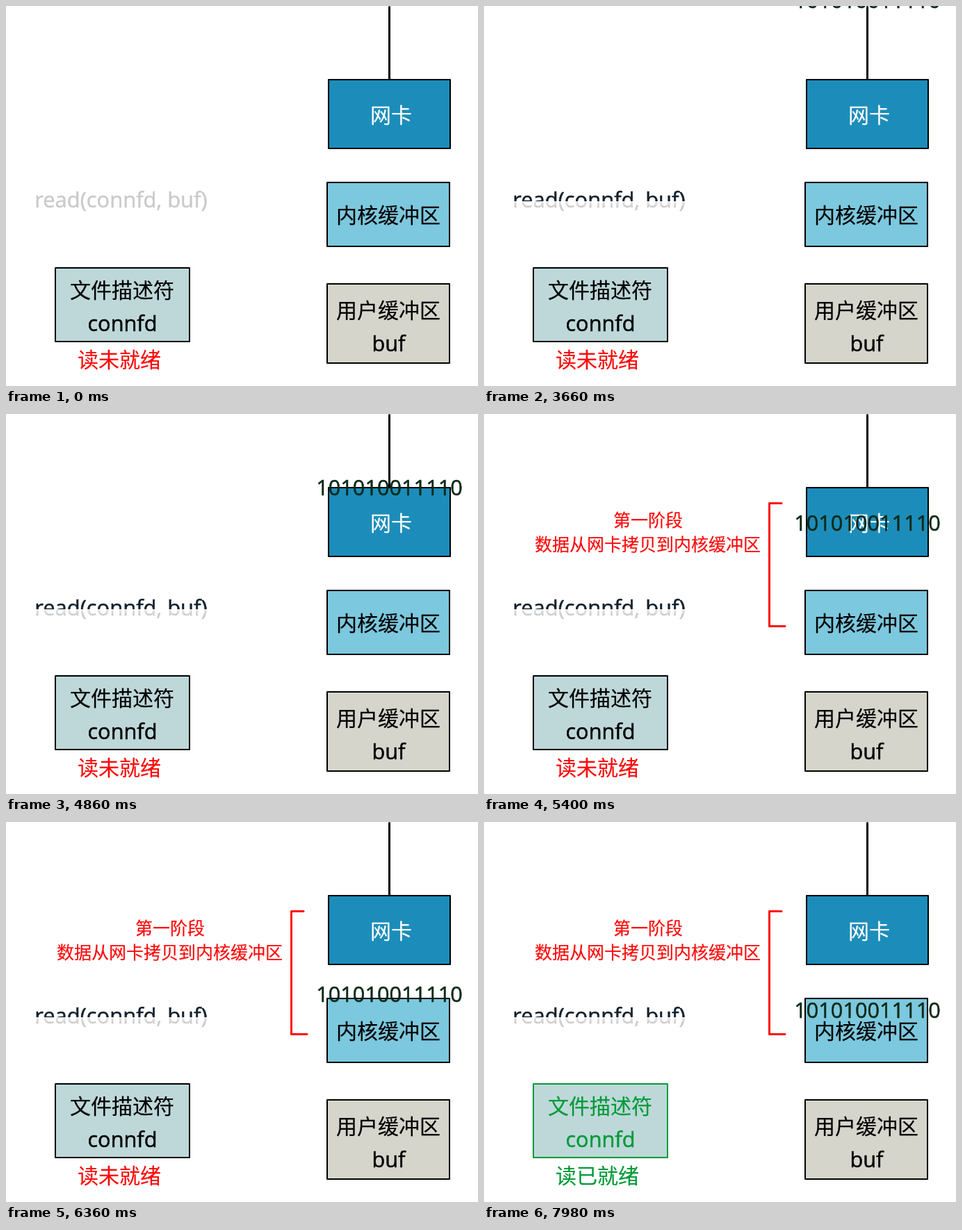
Recreate the animation shown at these times as an HTML page with a canvas. Size 679 px wide and 547 px high, loop 8000 ms.

```html
<!DOCTYPE html>
<html lang="zh">
<head>
<meta charset="utf-8">
<style>
html, body { margin: 0; width: 100%; height: 100%; overflow: hidden; background: #fff; }
canvas { display: block; }
</style>
</head>
<body>
<canvas id="stage" width="679" height="547"></canvas>
<script>
const ctx = document.getElementById('stage').getContext('2d');
const LOOP = 8000, STEP = 60;
const HAN = '"Noto Sans CJK SC", "Noto Sans CJK", sans-serif';
const LATIN = '"Open Sans", "Noto Sans", sans-serif';
const INK = '#000', RED = '#ff0a0a', GREEN = '#009a38', DIGITS = '#0c2a18';

const clamp01 = v => Math.max(0, Math.min(1, v));
const progress = (t, from, to) => clamp01((t - from) / (to - from));
const lerp = (a, b, k) => a + (b - a) * k;

// A hairline outline gives the letters a slightly heavier weight.
function label(text, x, y, color, size, family, weight, align = 'center') {
  ctx.font = `${size}px ${family}`;
  ctx.textAlign = align;
  ctx.fillStyle = ctx.strokeStyle = color;
  ctx.lineWidth = weight;
  ctx.lineJoin = 'round';
  ctx.fillText(text, x, y);
  ctx.strokeText(text, x, y);
}
const han = (text, x, y, color = INK, size = 30) => label(text, x, y, color, size, HAN, 0.2);
const latin = (text, x, y, color = INK) => label(text, x, y, color, 30.7, LATIN, 0.5);

function box(x, y, w, h, fill, border = INK) {
  ctx.fillStyle = fill;
  ctx.fillRect(x, y, w, h);
  ctx.strokeStyle = border;
  ctx.lineWidth = 2;
  ctx.lineJoin = 'round';
  ctx.strokeRect(x, y, w, h);
}

function polyline(color, points) {
  ctx.strokeStyle = color;
  ctx.lineWidth = 3;
  ctx.lineCap = ctx.lineJoin = 'round';
  ctx.beginPath();
  points.forEach(([x, y]) => ctx.lineTo(x, y));
  ctx.stroke();
}

// Grey call text, darkened from the top by a wipe that stalls halfway.
function drawCall(t) {
  let color = '#cacaca';
  if (t >= 720) {
    const edge = lerp(265.3, 281, progress(t, 660, 1440));
    const wipe = ctx.createLinearGradient(0, edge - 1, 0, edge + 9);
    wipe.addColorStop(0, '#10202c');
    wipe.addColorStop(0.1, '#10202c');
    wipe.addColorStop(0.15, '#e6e6e6');
    wipe.addColorStop(1, '#cacaca');
    color = wipe;
  }
  label('read(connfd, buf)', 41.3, 290, color, 30.9, LATIN, 0.5, 'left');
}

function drawDescriptor(ready) {
  const color = ready ? GREEN : INK;
  box(71, 377, 193, 106, '#bed8da', color);
  han('文件描述符', 167, 420, color);
  latin('connfd', 167.5, 468, color);
  han(ready ? '读已就绪' : '读未就绪', 163, 519.5, ready ? GREEN : RED);
}

function drawPhase() {
  han('第一阶段', 236, 162, RED, 25);
  han('数据从网卡拷贝到内核缓冲区', 235.5, 197, RED, 25);
  polyline(RED, [[428, 128.5], [410.5, 128.5], [410.5, 305.5], [433, 305.5]]);
}

// The signal line grows toward the descriptor, then vanishes from its tail.
function drawSignal(t) {
  const head = progress(t, 6570, 7237), tail = progress(t, 7285, 7955);
  if (head <= tail) return;
  const at = k => [lerp(463, 263.5, k), lerp(327.5, 455.5, k)];
  polyline(GREEN, [at(tail), at(head)]);
}

function draw(t) {
  ctx.fillStyle = '#fff';
  ctx.fillRect(0, 0, 679, 547);

  polyline(INK, [[551.5, 1.5], [551.5, 106]]);
  box(464, 106, 175, 99, '#1c8dba');
  han('网卡', 554, 168, '#fff');
  box(462, 254, 176, 92, '#7cc8de');
  han('内核缓冲区', 550, 311.5);
  box(462, 400, 176, 114, '#d6d5cc');
  han('用户缓冲区', 550, 448.5);
  latin('buf', 550.5, 496.5);

  drawCall(t);
  drawDescriptor(t >= 7260);
  if (t >= 5100) drawPhase();
  drawSignal(t);
  if (t >= 3660) {
    latin('101010011110', 551.5, lerp(-2.5, 281.5, progress(t, 3600, 6600)), DIGITS);
  }
}

function tick(now) {
  const t = now % LOOP;
  draw(Math.floor(t / STEP) * STEP);
  requestAnimationFrame(tick);
}
draw(0);
requestAnimationFrame(tick);
</script>
</body>
</html>
```
